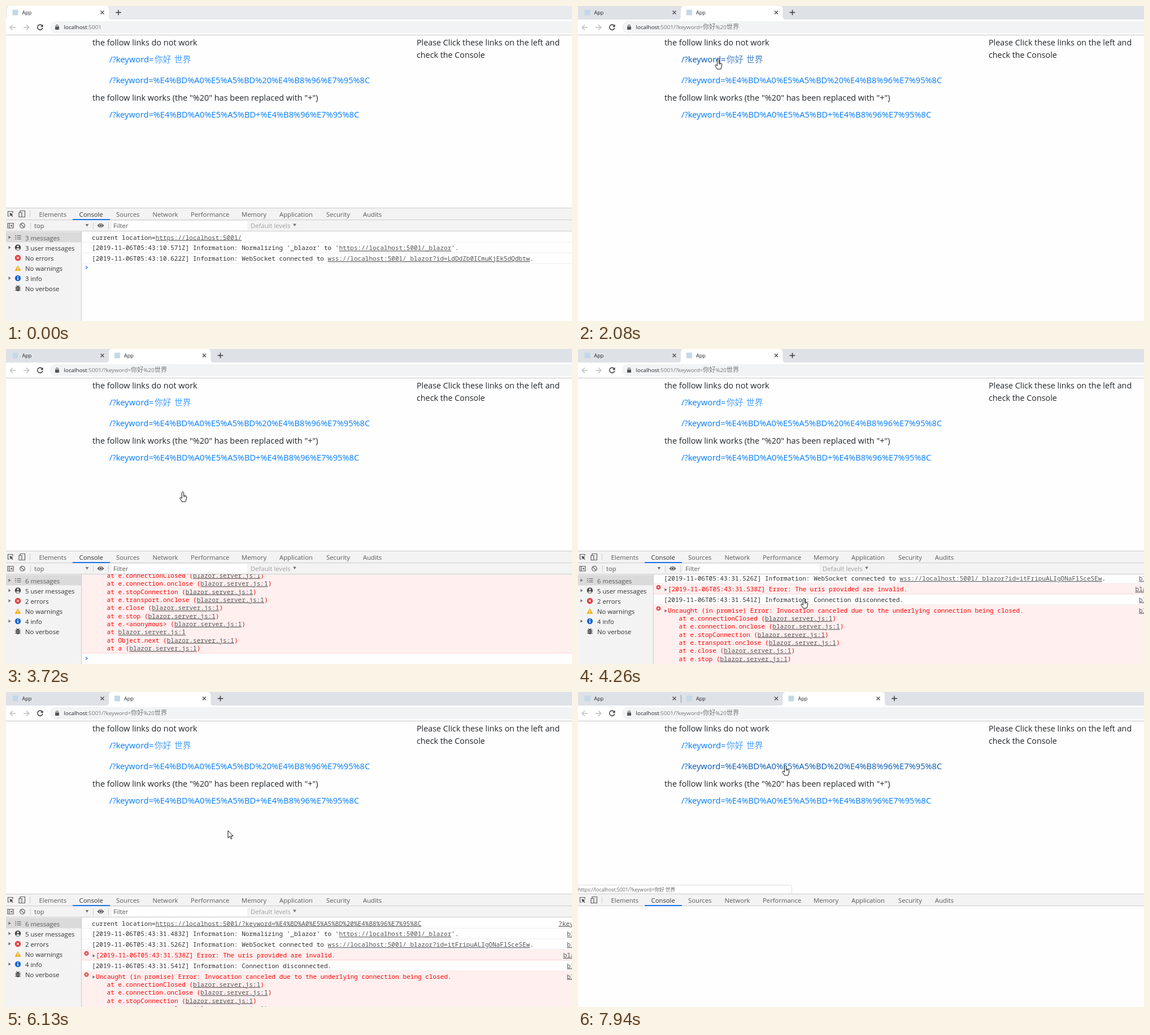
An HTML page that plays this animation: 1002 by 559 pixels, repeating every 8 s.

```html
<!DOCTYPE html>
<html lang="en">
<head>
<meta charset="utf-8">
<title>Console demo</title>
<style>
  html, body { margin: 0; width: 100%; height: 100%; overflow: hidden; background: #fefefe; }
  svg { display: block; width: 100vw; height: 100vh; }
  text { font-family: "Open Sans", "Noto Sans", "Noto Sans CJK SC", sans-serif; fill: #212529; white-space: pre; }
  .cjk { font-family: "Noto Sans CJK SC", "Noto Sans CJK", sans-serif; font-weight: 300; }
  .link text { fill: #007bff; }
  .link .cjk { fill-opacity: .72; }
  .link.hover text { fill: #0056b3; }
  .ui { font-size: 11.3px; fill: #5a5a5a; }
  .dark { fill: #303030; }
  .pale { fill: #a0a0a0; }
  .mono { font: 11.05px "Noto Sans Mono", "DejaVu Sans Mono", monospace; fill: #303030; }
  .mono.error { fill: #f00; }
  .mono .url { fill: #545454; text-decoration: underline; text-decoration-skip-ink: none; }
  .line { fill: none; stroke: #5a5a5a; stroke-width: 1.2; }
  .rule { stroke: #ccc; }
</style>
</head>
<body>
<svg id="stage" viewBox="0 0 1002 559" preserveAspectRatio="none"></svg>
<script>
const LOOP = 8000, TAB = 180.5, ROW = 18.8, LINE = 14.35;

// Markup helpers
const text = (x, y, s, size, cls = '') =>
  `<text x="${x}" y="${y}" class="${cls}"${size ? ` font-size="${size}"` : ''}>${s}</text>`;
const ui = (x, y, s, cls = '') => text(x, y, s, 0, 'ui ' + cls);
const mono = (x, y, s, cls = '') =>
  text(x, y, s.replace(/{(.*?)}/g, '<tspan class="url">$1</tspan>'), 0, 'mono ' + cls);
const rect = (x, y, w, h, fill, rx = 0) =>
  `<rect x="${x}" y="${y}" width="${w}" height="${h}" fill="${fill}" rx="${rx}"/>`;
const path = (d, attrs = 'class="line"') => `<path d="${d}" ${attrs}/>`;
const during = (ranges, body) => `<g data-on="${ranges}">${body}</g>`;
const triangle = (x, y) => path(`M${x} ${y - 2.8}l4 2.8-4 2.8z`, 'fill="#6e6e6e"');
const down = (x, y) => path(`M${x - 2.8} ${y - 2}h5.6l-2.8 4.4z`, 'fill="#6e6e6e"');
const errorDot = (x, y, r) =>
  `<circle cx="${x}" cy="${y}" r="${r}" fill="#e0383a"/>` +
  path(`M${x - r * .4} ${y - r * .4}l${r * .8} ${r * .8}m0 ${-r * .8}l${-r * .8} ${r * .8}`, 'stroke="#fff" stroke-width="1.1"');
const prompt = y => path(`M141 ${y - 2.5}l3 2.5-3 2.5`, 'fill="none" stroke="#367cf1" stroke-width="1.3"');

function browserFrame() {
  const tabs = [0, 1, 2].map(i => `<g class="tab" transform="translate(${i * TAB} 0)">
    ${rect(11.5, 6.5, 10, 10, '#c3d9e8')}
    ${text(28.5, 15, 'App', 9.1)}
    ${path('M167.5 8.5l6 6m0-6l-6 6', 'stroke="#4a4a4a" stroke-width="1.3"')}</g>`).join('');
  return `<rect id="strip" width="1002" height="24"/>
    <path id="activeTab" fill="#fff"/>
    <path id="divider" d="M182.5 5v14" stroke="#8a8d92"/>
    ${tabs}
    <path id="plus" d="M-4.8 11.5h9.6m-4.8-4.8v9.6" stroke="#333" stroke-width="1.4"/>
    ${rect(0, 24, 1002, 27, '#fff')}${rect(78, 27, 960, 21.5, '#f1f3f4', 10.7)}
    ${path('M0 51.5h1002', 'stroke="#c4c4c4"')}
    ${path('M17 38H7.5m4.5-4.8L7.2 38l4.8 4.8M31 38h9.5M36 33.2l4.8 4.8-4.8 4.8', 'fill="none" stroke="#bdbdbd" stroke-width="1.4"')}
    ${path('M64 35a4.6 4.6 0 1 0 .8 3.8', 'fill="none" stroke="#444" stroke-width="1.6"')}
    ${path('M65.6 32.6v4.6H61z', 'fill="#444"')}
    ${rect(87, 36.5, 7, 5.5, '#555', .7)}${path('M88.6 37v-1.6a1.9 1.9 0 0 1 3.8 0V37')}
    <text x="102.5" y="41.4" font-size="9.85">localhost<tspan fill="#777">:5001<tspan id="query">/?keyword=<tspan
      class="cjk" font-size="11.2">你好</tspan>%20<tspan class="cjk" font-size="11.2">世界</tspan></tspan></tspan></text>`;
}

function page() {
  return text(153, 69.5, 'the follow links do not work', 14.45) +
    `<g class="link">${text(183, 99.7, '/?keyword=', 14.8)}${text(263, 99.7, '你好', 14.7, 'cjk')}${text(298, 99.7, '世界', 14.7, 'cjk')}</g>
    <g class="link">${text(183, 137.3, '/?keyword=%E4%BD%A0%E5%A5%BD%20%E4%B8%96%E7%95%8C', 14.63)}</g>` +
    text(153, 167.7, 'the follow link works (the "%20" has been replaced with "+")', 14.46) +
    `<g class="link">${text(183, 197.8, '/?keyword=%E4%BD%A0%E5%A5%BD+%E4%B8%96%E7%95%8C', 14.68)}</g>` +
    text(727, 69.5, 'Please Click these links on the left and', 14.32) +
    text(727, 92.2, 'check the Console', 14.32);
}

function devtoolsTabs() {
  const names = { Elements: 58.5, Console: 129.5, Sources: 195, Network: 259.5, Performance: 327,
    Memory: 417, Application: 484, Security: 567, Audits: 632 };
  return rect(0, 358, 1002, 21, '#f3f3f3') +
    path('M0 358.5h1002M0 379.5h1002', 'class="rule"') + path('M42.5 363v12', 'class="rule"') +
    Object.entries(names).map(([n, x]) => ui(x, 374, n, n === 'Console' ? 'dark' : '')).join('') +
    rect(118, 378, 66, 2, '#1a73e8') +
    path('M6 373H3.5v-8.5h8.5v3M25 366v-2.5h8.5v11H29M23 366.5h5v8h-5z') +
    path('M6.5 367l6 2.4-2.3 1 2.2 2.6-1.2 1-2.2-2.6-1.3 2z', 'fill="#444"');
}

function filterBar() {
  return rect(0, 380, 1002, 20, '#f3f3f3') + rect(187, 382, 240, 16, '#fff') +
    path('M0 399.5h1002M43.5 384v12M154.5 384v12M181.5 384v12', 'class="rule"') +
    path('M3 385.5h10v8.5H3zM6 385.5v8.5') + path('M10.8 387.5v4.5l-3-2.25z', 'fill="#5a5a5a"') +
    `<circle cx="29" cy="389.7" r="4.3" class="line"/>` + path('M26 386.7l6 6') +
    ui(50, 394, 'top') + down(143.5, 389) +
    path('M161.5 389.5q6-7.6 12 0q-6 7.6-12 0z', 'fill="#5a5a5a"') +
    '<circle cx="167.5" cy="389.5" r="2.4" fill="#5a5a5a" stroke="#f3f3f3"/>' +
    ui(190, 394, 'Filter') + ui(433, 394, 'Default levels', 'pale') + down(511, 388.5) +
    rect(0, 400, 133, 159, '#f3f3f3') + rect(0, 401, 133, 18.3, '#dadada') +
    path('M133.5 400v159', 'class="rule"');
}

const sidebar = (labels, arrows) =>
  labels.map((s, i) => ui(34, 415.8 + 18.1 * i, s, i ? 'dark' : '')).join('') +
  arrows.map(i => triangle(4.5, 410.5 + 18.1 * i)).join('');

const sidebarIcons = () =>
  path('M16 407.5h2m1.5 0H26.5M16 410.5h2m1.5 0H26.5M16 413.5h2m1.5 0H26.5') +
  '<circle cx="21" cy="428.5" r="5.2" fill="#444"/><circle cx="21" cy="426.8" r="1.8" fill="#f3f3f3"/>' +
  path('M17.5 431.5q3.5-3.6 7 0q-3.5 2.8-7 0z', 'fill="#f3f3f3"') +
  errorDot(21, 447, 5.2) +
  path('M21 460l5.6 10H15.4z', 'fill="#f2b01e"') + path('M21 463.5v3.4m0 1v1.2', 'stroke="#fff" stroke-width="1.3"') +
  '<circle cx="21" cy="483" r="5.2" fill="#1a66d0"/>' + path('M21 479.6v1.5m0 1v4', 'stroke="#fff" stroke-width="1.6"') +
  rect(18.2, 497, 5.6, 9, '#444', 2.6) +
  path('M16 499h10M16 501.7h10M16 504.5h10M18.5 495.5l1.5 2m3.5-2l-1.5 2', 'stroke="#444" stroke-width="1.1"') +
  path('M19.6 500.4h2.8m-2.8 2.7h2.8', 'stroke="#f3f3f3" stroke-width=".8"');

function messages(rows, stack = []) {
  return rows.map(({ s, side, error }, i) => {
    const top = 400.7 + ROW * i, base = top + 13.8;
    const height = ROW + (i === 5 ? stack.length * LINE : 0);
    return (error ? rect(134, top, 868, height, '#ffefef') : '') +
      path(`M134 ${top + height - .2}h868`, `stroke="${error ? '#ffd2d2' : '#ededed'}"`) +
      (error ? errorDot(142.5, top + 6.8, 3.8) + triangle(153.5, top + 11) : '') +
      mono(error ? 159 : 152, base, s, error ? 'error' : '') +
      (side ? mono(side === 'bla' ? 986.5 : side === '?key' ? 978 : 993, base, `{${side === '?key' ? '?keyword' : 'blazor'}}`) : '');
  }).join('') +
  stack.map((s, i) => mono(178.6, 508.5 + LINE * (i + 1), 'at ' + s, 'error')).join('');
}

const info = (time, s) => `[2019-11-06T05:43:${time}Z] Information: ${s}`;
const normalizing = "Normalizing '_blazor' to '{https://localhost:5001/_blazor}'.";
const socket = id => `WebSocket connected to {wss://localhost:5001/_blazor?id=${id}}.`;

const firstLog = messages([
  { s: 'current location={https://localhost:5001/}' },
  { s: info('10.571', normalizing) },
  { s: info('10.622', socket('LdDdZb0ICmuKjEk5dQdbtw')) },
]) + prompt(464);

const calls = ['connectionClosed', 'connection.onclose', 'stopConnection', 'transport.onclose', 'close', 'stop', '&lt;anonymous&gt;'];
const secondLog = messages([
  { s: 'current location={https://localhost:5001/?keyword=%E4%BD%A0%E5%A5%BD%20%E4%B8%96%E7%95%8C}', side: '?key' },
  { s: info('31.483', normalizing), side: 'bl' },
  { s: info('31.526', socket('itFripuALIgONaFlSceSEw')), side: 'bl' },
  { s: '[2019-11-06T05:43:31.538Z] Error: The uris provided are invalid.', side: 'bla', error: true },
  { s: info('31.541', 'Connection disconnected.'), side: 'bl' },
  { s: 'Uncaught (in promise) Error: Invocation canceled due to the underlying connection being closed.', side: 'bl', error: true },
], [...calls.map(c => `e.${c} ({blazor.server.js:1})`), '{blazor.server.js:1}',
  'Object.next ({blazor.server.js:1})', 'a ({blazor.server.js:1})']) + prompt(666);

document.getElementById('stage').innerHTML =
  '<clipPath id="log"><rect x="134" y="400" width="868" height="159"/></clipPath>' +
  rect(0, 0, 1002, 559, '#fefefe') + page() + browserFrame() +
  during('0-1680 2710-6990 7870-8000', devtoolsTabs()) +
  during('0-1680 2860-6990', filterBar()) +
  during('0-1680', sidebar(['3 messages', '3 user messages', 'No errors', 'No warnings', '3 info', 'No verbose'], [0, 1, 4]) + firstLog) +
  during('2940-6990', sidebar(['6 messages', '5 user messages', '2 errors', 'No warnings', '4 info', 'No verbose'], [0, 1, 2, 4])) +
  during('0-1680 3020-6990', sidebarIcons()) +
  during('2940-3020', prompt(407.5)) +
  during('3020-6990', `<g clip-path="url(#log)"><g id="scroll">${secondLog}</g></g>`) +
  during('2790-3650 6590-6990 7940-8000',
    path('M-1 342.5H375q3.5 0 3.5 3.5V358H-1z', 'fill="#fff" stroke="#e0e0e0"') +
    `<text x="0" y="353.6" font-size="8.75" style="fill:#666">https://localhost:5001/?keyword=<tspan class="cjk">你好 世界</tspan></text>`) +
  `<g id="cursor" stroke="#111" stroke-width="1" fill="#fff" stroke-linejoin="round">
    <path id="arrow" d="M0 0v13l3-2.8 2.1 4.6 2-.9-2-4.4h4.1z"/>
    <g id="hand"><path d="M-1.6 1.4Q0-.8 1.6 1.4V6.6l4 1.2q1.5.5 1.2 2.2l-.7 4-1.4 4H-1.4l-3.6-5.6q-.6-2.2 1.4-1.8l2 1.6z"/>
    <path d="M1.6 6.6v3M3.8 7.4v2.6" fill="none"/></g></g>`;

// Pointer moves: start, end, number of positions, way points
const moves = [
  [150, 300, 3, [[739, 451], [500, 370], [284, 280]]],
  [470, 710, 4, [[280, 245], [265, 170], [254, 128], [248, 93]]],
  [2000, 2080, 2, [[248, 94], [248, 94]]],
  [3420, 4030, 9, [[252, 132], [285, 195], [340, 310], [398, 452], [400, 442]]],
  [4580, 5340, 11, [[385, 455], [345, 505], [430, 525], [477, 442], [521, 470], [480, 468], [425, 462]]],
  [5410, 5810, 6, [[425, 462], [510, 466], [595, 469], [530, 468], [470, 469]]],
  [5960, 6750, 11, [[455, 375], [393, 246], [382, 200], [372, 150], [366, 124], [367, 130]]],
];

function pointerAt(t) {
  const move = moves.filter(m => t >= m[0]).pop();
  if (!move) return null;
  const [start, end, count, points] = move;
  const step = Math.floor(Math.min(1, (t - start) / (end - start)) * (count - 1) + 1e-6);
  const along = step / (count - 1) * (points.length - 1);
  const i = Math.min(Math.floor(along), points.length - 2);
  return points[i].map((v, k) => Math.round(v + (points[i + 1][k] - v) * (along - i)));
}

const stepped = (t, stops) => stops.filter(s => t >= s[0]).pop()[1];
const $ = id => document.getElementById(id);
const show = (el, on) => { el.style.display = on ? '' : 'none'; };
const timed = [...document.querySelectorAll('[data-on]')].map(el =>
  [el, el.dataset.on.split(' ').map(r => r.split('-').map(Number))]);
const links = [...document.querySelectorAll('.link')];
const linkBoxes = [[84, 327], [122, 643], [183, 625]];
const tabs = [...document.querySelectorAll('.tab')];

function drawTabs(t) {
  const active = t < 1520 ? 0 : t < 6840 ? 1 : 2;
  const grown = stepped(t, [[0, 1], [1520, .45], [1600, .85], [1680, 1], [6840, .45], [6920, .85], [6990, 1]]);
  const left = 1.5 + TAB * active, width = TAB * grown, right = left + width;
  $('strip').setAttribute('fill', t < 880 ? '#e8eaed' : '#dee1e6');
  $('activeTab').setAttribute('d',
    `M${left - 5} 24q5 0 5-5V6q0-6 6-6H${right - 6}q6 0 6 6v13q0 5 5 5z`);
  $('plus').setAttribute('transform', `translate(${right + 17} 0)`);
  tabs.forEach((el, i) => show(el, i < active || i === active && grown > .9));
  show($('divider'), active === 2);
  show($('query'), t >= 1680);
}

function drawPointer(t) {
  const p = pointerAt(t);
  show($('cursor'), p);
  const over = linkBoxes.map(([y, right]) => !!p && p[0] >= 183 && p[0] <= right && p[1] >= y && p[1] <= y + 20);
  links.forEach((el, i) => el.classList.toggle('hover', over[i]));
  if (!p) return;
  const hand = t >= 2000 && t < 4580 || t >= 5960 && over.some(Boolean);
  show($('hand'), hand);
  show($('arrow'), !hand);
  $('cursor').setAttribute('transform', `translate(${p})`);
}

function draw(now) {
  const t = now % LOOP;
  timed.forEach(([el, ranges]) => show(el, ranges.some(([a, b]) => t >= a && t < b)));
  drawTabs(t);
  drawPointer(t);
  const scroll = stepped(t, [[0, 117], [4180, 85], [4260, 41], [4340, 10], [4420, 0]]);
  $('scroll').setAttribute('transform', `translate(0 ${-scroll})`);
}

const begin = performance.now();
function tick() {
  draw(performance.now() - begin);
  requestAnimationFrame(tick);
}
tick();
</script>
</body>
</html>
```
